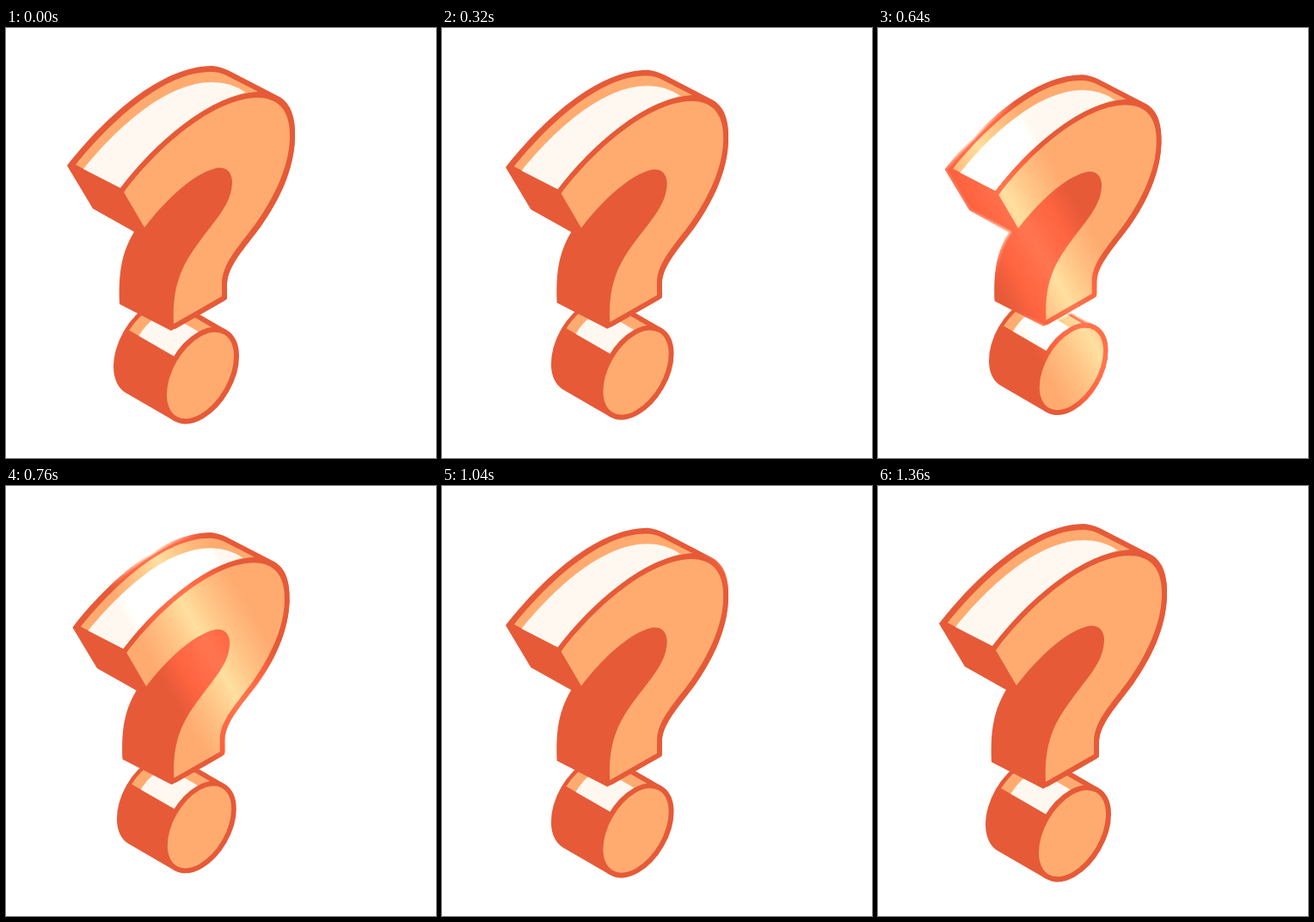
An HTML page that plays this animation: 500x500 px, repeating every 2 s.

```html
<!DOCTYPE html>
<html lang="en">
<head>
<meta charset="utf-8">
<title>Question mark</title>
<style>
  html, body { margin: 0; width: 100%; height: 100%; overflow: hidden; background: #fff; }
  svg { display: block; width: 100vw; height: 100vh; isolation: isolate; }
  .side { fill: #e65a38; }
  .rim { fill: none; stroke: url(#edge); stroke-width: 5; filter: blur(1px); }
  .strip { fill: #ffab70; }
  .gloss { fill: #fff8f1; }
  .face { fill: #ffab70; stroke: #e65a38; stroke-width: 12; stroke-linejoin: round; paint-order: stroke; }
  .shine { fill: url(#band); mix-blend-mode: color-dodge; }
</style>
</head>
<body>
<svg viewBox="0 0 500 500">
  <defs>
    <linearGradient id="band" gradientUnits="userSpaceOnUse" x1="-56" y1="32.5" x2="56" y2="-32.5">
      <stop offset="0" stop-color="#000"/>
      <stop offset=".5" stop-color="#3c3c4d"/>
      <stop offset="1" stop-color="#000"/>
    </linearGradient>
    <linearGradient id="edge" gradientUnits="userSpaceOnUse" x1="-56" y1="32.5" x2="56" y2="-32.5">
      <stop offset="0" stop-color="#fff3dc" stop-opacity="0"/>
      <stop offset=".5" stop-color="#fff3dc" stop-opacity=".75"/>
      <stop offset="1" stop-color="#fff3dc" stop-opacity="0"/>
    </linearGradient>
    <path id="dot" d="M195.5 456.8l-57-33A61 38-60 0 1 199.5 318.2l57 33A61 38-60 0 1 195.5 456.8Z"/>
    <path id="hook" d="M71 160C115 104 180 44 240 44Q250 45 260 50L318 80C331 88 337 103 336 128C335 165 318 200 297 230C278 256 258 276 257 298V315L192 352L132 321C131 292 132 265 149 237L101 210Z"/>
  </defs>
  <rect width="500" height="500" fill="#fff"/>
  <g id="mark">
    <use href="#dot" class="side"/>
    <use href="#dot" class="rim"/>
    <g transform="translate(226 404) rotate(-60)">
      <path class="strip" d="M4-30V-98A55 32 0 0 1 55-66V0Z"/>
      <path class="gloss" d="M4-30V-85A40 20 0 0 1 43-66V0Z"/>
      <ellipse class="face" rx="55" ry="32"/>
    </g>
    <use href="#hook" class="side"/>
    <use href="#hook" class="rim"/>
    <path class="strip" d="M81 159C123 107 184 51 238 51Q248 51 256 55L293 74C240 78 178 128 133 186Z"/>
    <path class="gloss" d="M90 164C129 116 186 63 240 63Q262 63 279 75C232 86 176 131 133 186Z"/>
    <path class="face" d="M137 191C175 140 240 82 292 81C320 81 331 100 330 128C329 162 312 196 292 225C272 253 252 272 251 296V312L195 344C193 300 204 276 226 247C246 220 263 203 263 178C262 165 254 161 244 163C219 169 187 198 161 232Z"/>
  </g>
  <rect class="shine" width="500" height="500"/>
</svg>
<script>
  const LOOP = 2000, ACTIVE = 1360, STEP = 40;
  const mark = document.getElementById('mark');
  const gradients = document.querySelectorAll('linearGradient');

  function draw(now) {
    const t = Math.min(Math.floor(now % LOOP / STEP) * STEP, ACTIVE);
    const scale = 1 - 0.025 * (1 - Math.cos(2 * Math.PI * t / ACTIVE));
    mark.setAttribute('transform', `translate(204 252) scale(${scale}) translate(-204 -252)`);

    // The light band sweeps from lower left to upper right at constant speed.
    const pos = 32 + (t - 640) * 0.64;
    for (const g of gradients) {
      g.setAttribute('gradientTransform', `translate(${pos * 0.866} ${-pos * 0.5})`);
    }
  }

  const start = performance.now();
  function tick() {
    draw(performance.now() - start);
    requestAnimationFrame(tick);
  }
  tick();
</script>
</body>
</html>
```
